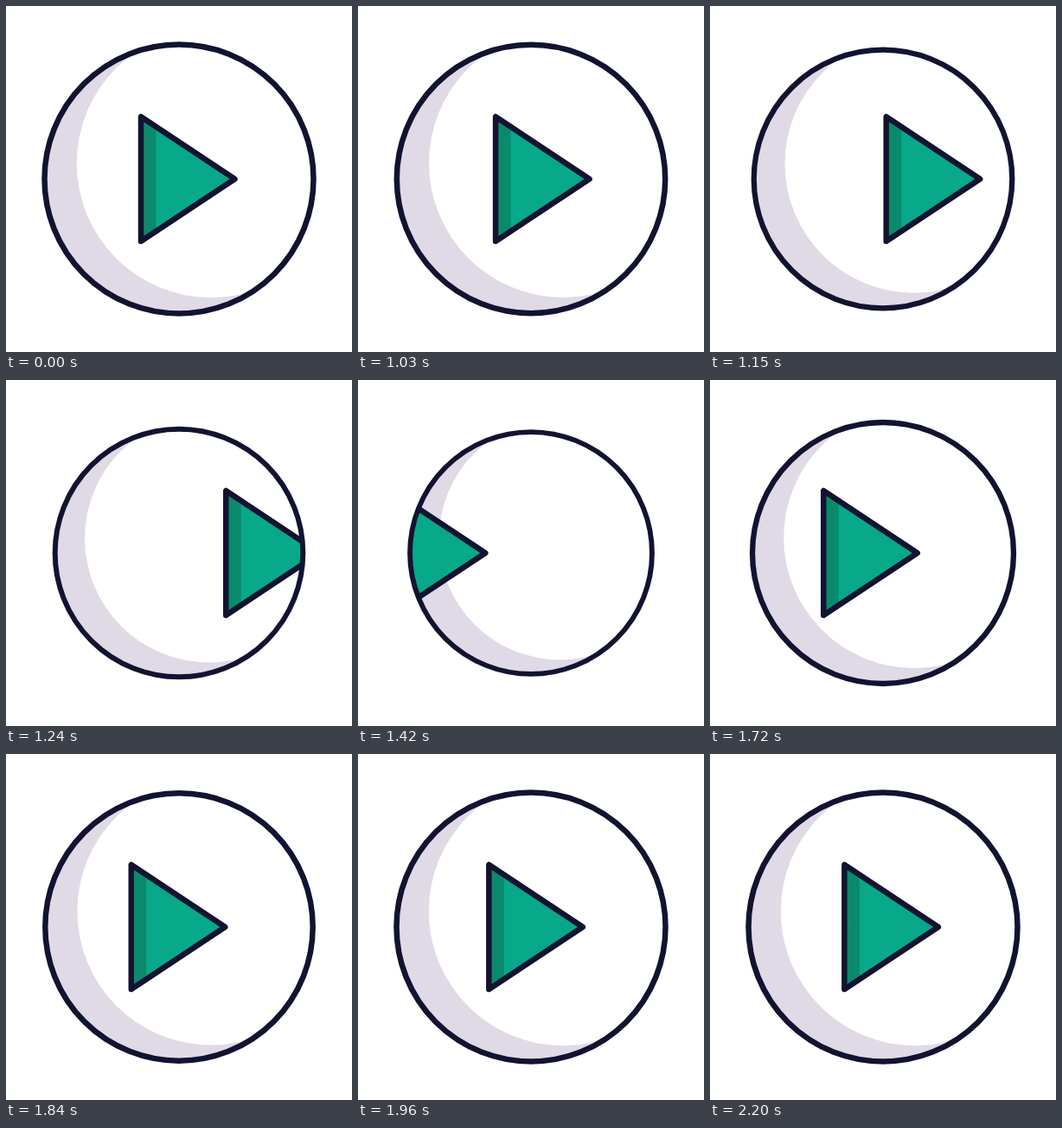
An HTML page for the animation above (2.23 s loop, 400x400 px).

```html
<!DOCTYPE html>
<html lang="en">
<head>
<meta charset="utf-8">
<title>Play button</title>
<style>
  html, body { margin: 0; height: 100%; overflow: hidden; background: #fff; }
  svg { display: block; width: 100vw; height: 100vh; }
  .line { fill: none; stroke: #121331; stroke-width: 6.5; stroke-linejoin: round; }
</style>
</head>
<body>
<svg viewBox="0 0 400 400">
  <defs>
    <clipPath id="disc"><circle id="discShape" cx="200" cy="200" r="155.5"/></clipPath>
    <g id="arrow">
      <path fill="#0a8a6c" d="M156 128V272L264.5 200Z"/>
      <path fill="#08a88a" d="M173.5 139.6V260.4L264.5 200Z"/>
      <path class="line" d="M156 128V272L264.5 200Z"/>
    </g>
  </defs>
  <g clip-path="url(#disc)">
    <g class="scaled">
      <circle cx="200" cy="200" r="155.5" fill="#e0dae6"/>
      <circle cx="237.3" cy="181.7" r="155.5" fill="#fff"/>
    </g>
    <g id="arrows">
      <use href="#arrow"/>
      <use href="#arrow" x="-316"/>
    </g>
  </g>
  <circle class="line scaled" cx="200" cy="200" r="155.5"/>
</svg>
<script>
const LOOP = 2230, REST = 1000, STEP = 30;
const TRAVEL = 316, SHRINK = 0.104, SHRUNK_AT = 355, GROWN_AT = 915;

const arrows = document.getElementById('arrows');
const discShape = document.getElementById('discShape');
const scaled = document.querySelectorAll('.scaled');

function smooth(from, to, t) {
  const u = Math.min(1, Math.max(0, (t - from) / (to - from)));
  return u * u * (3 - 2 * u);
}

// Quick start with a long, soft tail
const slide = t => TRAVEL * (1 - Math.exp(-Math.pow(t / 422, 1.75)));

function draw(now) {
  const elapsed = Math.max(0, now % LOOP - REST);
  const t = Math.floor(elapsed / STEP) * STEP;
  const scale = 1 - SHRINK * (smooth(0, SHRUNK_AT, t) - smooth(SHRUNK_AT, GROWN_AT, t));
  const zoom = `translate(200 200) scale(${scale}) translate(-200 -200)`;
  scaled.forEach(el => el.setAttribute('transform', zoom));
  discShape.setAttribute('transform', zoom);
  arrows.setAttribute('transform', `translate(${slide(t)} 0)`);
}

const start = performance.now();
function tick() {
  draw(performance.now() - start);
  requestAnimationFrame(tick);
}
tick();
</script>
</body>
</html>
```
